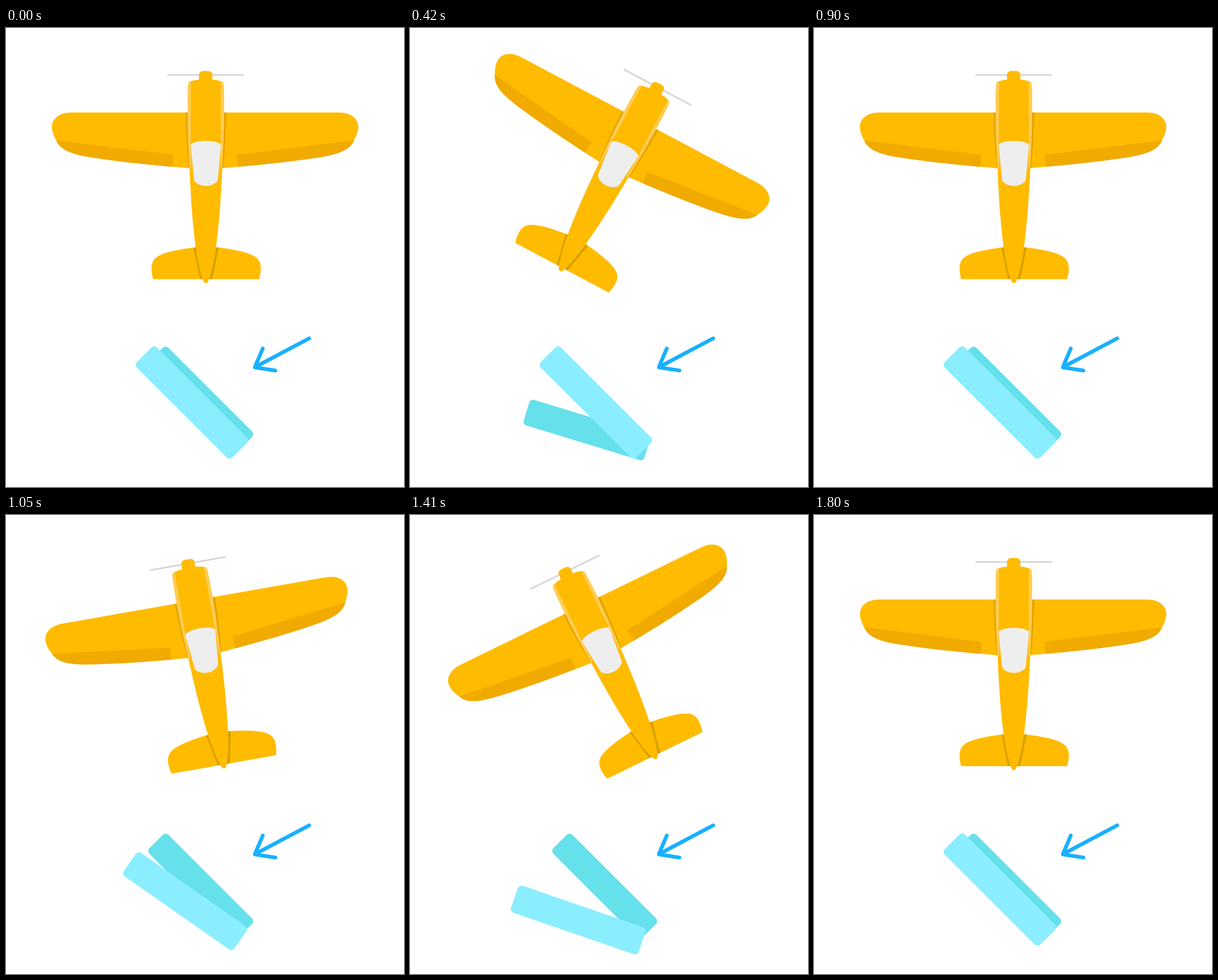
Write an HTML page with a canvas that moves like this. It is 697 by 804 pixels and loops after 2.87 s.

```html
<!DOCTYPE html>
<html lang="en">
<head>
<meta charset="utf-8">
<title>Plane and rudder</title>
<style>
  html, body { margin: 0; width: 100%; height: 100%; overflow: hidden; background: #fff; }
  canvas { display: block; }
</style>
</head>
<body>
<canvas id="stage" width="697" height="804"></canvas>
<script>
const ctx = document.getElementById('stage').getContext('2d');
const LOOP = 2870, STEP = 30, SWING = 450, TILT = 30;
const YELLOW = '#ffbb00', FLAP = '#f0aa00', SEAM = '#e6a300', FIN = '#d99f00', SHINE = '#ffcc55';
const CENTER = { x: 348.7, y: 261 };

const path = d => new Path2D(d);

// Left halves; each is mirrored about its own axis.
const wing = path('M349 148H115C93 148 80 159 80.5 174C81 185 86 193 90 201C98 214 114 221 150 226.8C210 236 270 241.5 322 245.7L349 246Z');
const flap = path('M86 196.8L293.5 222L291 250H80Z');
const seam = path('M314.5 148H320L324 246L320.5 245.5C317 215 315.5 180 314.5 148Z');
const tail = path('M258 440C254 428 252.500 411 262 403C273 393 303 387.500 333 384H351V440Z');
const fin = path('M328.300 384.700L334 384L346 440H339.800Z');
const shine = path('M320.500 94.800Q322 93.500 324 93.200L323.600 204L324.500 246H321.600C319.500 210 318 180 318 150C318 128 318.300 110 319 98Z');

const body = path('M324 93.300Q331 90.500 338 90.500H362Q369 90.500 376 93.300Q380.800 94.500 381 98' +
  'C381.700 110 382 128 382 150C382 180 380.500 210 379 240C376.500 300 373 345 367.500 386' +
  'C365 405 361 424 356.500 438Q353.500 447 350 447Q346.500 447 343.500 438' +
  'C339 424 335 405 332.500 386C327 345 323.500 300 321.300 240C319.500 210 318 180 318 150' +
  'C318 128 318.300 110 319 98Q319.200 94.500 324 93.300Z');
const cap = path('M338 96V83Q338 75.300 346 75.300H353.500Q361.500 75.300 361.500 83V96Z');
const blade = path('M281 81H415.500L418.300 83.800H284.500Z');
const canopy = path('M325 203C335 196 365 196 375 203Q377 204 376.500 207L371 265Q370.500 269 367 271' +
  'C358 278.500 342 278.500 333 271Q329.800 269 329.300 265L323.500 207Q323 204 325 203Z');

function fill(shape, color) {
  ctx.fillStyle = color;
  ctx.fill(shape);
}

function mirrored(axis, draw) {
  draw();
  ctx.save();
  ctx.translate(2 * axis, 0);
  ctx.scale(-1, 1);
  draw();
  ctx.restore();
}

function drawWing() {
  fill(wing, YELLOW);
  ctx.save();
  ctx.clip(wing);
  fill(flap, FLAP);
  ctx.restore();
}

function drawPlane(deg) {
  ctx.save();
  ctx.translate(CENTER.x, CENTER.y);
  ctx.rotate(deg * Math.PI / 180);
  ctx.translate(-CENTER.x, -CENTER.y);
  fill(blade, '#d5d5d5');
  mirrored(348.7, drawWing);
  mirrored(350.3, () => fill(seam, SEAM));
  mirrored(350.6, () => fill(tail, YELLOW));
  mirrored(350.4, () => fill(fin, FIN));
  fill(body, YELLOW);
  mirrored(350, () => fill(shine, SHINE));
  fill(cap, YELLOW);
  fill(canopy, '#eeeeee');
  ctx.restore();
}

// Slides along a line while turning; amount runs from 0 to 1.
function drawBar(bar, amount) {
  ctx.save();
  ctx.translate(bar.x + bar.dx * amount, bar.y + bar.dy * amount);
  ctx.rotate((45 - TILT * amount) * Math.PI / 180);
  ctx.fillStyle = bar.color;
  ctx.beginPath();
  ctx.roundRect(-bar.w / 2, -bar.h / 2, bar.w, bar.h, 7);
  ctx.fill();
  ctx.restore();
}

const backBar = { x: 341, y: 650, dx: -33.5, dy: 58, w: 221, h: 47, color: '#66e0eb' };
const frontBar = { x: 325.5, y: 656, dx: -35.6, dy: 61.6, w: 236.5, h: 50, color: '#8aeeff' };

const arrow = path('M531 543.700L436 594M449.700 561.500L436 593.500M471.700 600L436 594.500');

function drawArrow() {
  ctx.strokeStyle = '#18b0ff';
  ctx.lineWidth = 6.6;
  ctx.lineCap = ctx.lineJoin = 'round';
  ctx.stroke(arrow);
}

// Triangle wave: right, level, left, level, then rest.
function swingAt(t) {
  const p = t / SWING;
  if (p >= 4) return 0;
  return p < 1 ? p : p < 3 ? 2 - p : p - 4;
}

function draw(now) {
  const t = Math.floor((now % LOOP) / STEP) * STEP;
  const swing = swingAt(t);
  ctx.fillStyle = '#fff';
  ctx.fillRect(0, 0, 697, 804);
  drawPlane(TILT * swing);
  drawBar(backBar, Math.max(0, swing));
  drawBar(frontBar, Math.max(0, -swing));
  drawArrow();
}

let start;
function tick(now) {
  start ??= now;
  draw(now - start);
  requestAnimationFrame(tick);
}
draw(0);
requestAnimationFrame(tick);
</script>
</body>
</html>
```
